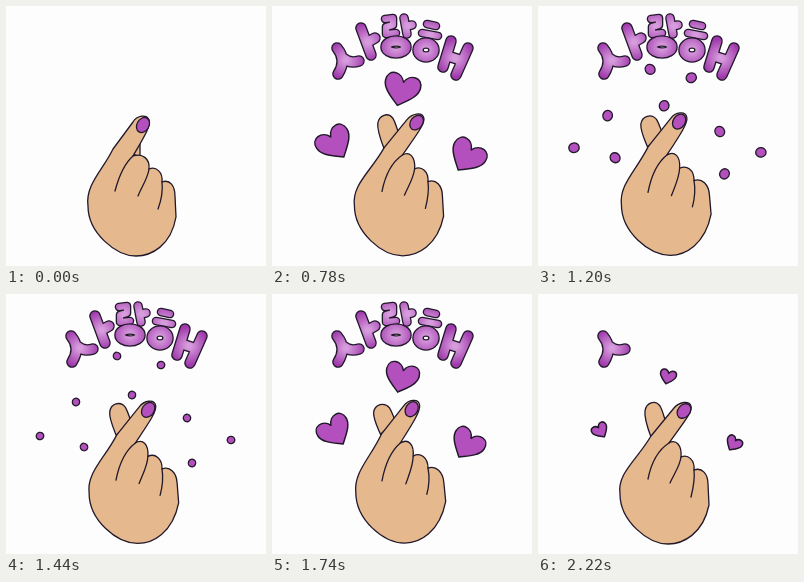
Recreate the animation shown at these times as an HTML page with a canvas. Size 260 by 260 pixels, loop 2280 ms.

```html
<!DOCTYPE html>
<html lang="ko">
<head>
<meta charset="utf-8">
<title>사랑해</title>
<style>
  html, body { margin: 0; width: 100%; height: 100%; overflow: hidden; background: #fdfdfe; }
  canvas { display: block; }
</style>
</head>
<body>
<canvas id="stage" width="260" height="260"></canvas>
<script>
const ctx = document.getElementById('stage').getContext('2d');
const LOOP = 2280, REST = 480, STEP = 60, LAST = 29;
const INK = '#21182a', SKIN = '#e6b88e', PURPLE = '#b350bd';

// Poses share one path structure, so their numbers can be blended.
const restPose = {
  back: 'M125 147 L134 136 L134 151 Z',
  body: 'M82 200 C79 179 97 164 107 143 L127 116 C131 109 141 108 143 114 C145 120 138 131 127 150 C137 147 144 153 143 163 C150 160 157 166 156 176 C164 173 169 180 169 190 L170 211 C165 240 145 250 130 250 C110 250 82 227 82 200 Z',
  creases: 'M127 150 C119 157 113 170 109 185 M143 163 C142 172 136 180 132 190 M156 176 C157 185 155 195 152 203',
  nail: [137, 119, -60]
};
const crossPose = {
  back: 'M113 143 C110 135 106 124 107 117 C108 109 117 105 122 112 C125 117 126 124 128 128 Z',
  body: 'M82 200 C79 179 99 166 113 142 L136 114 C141 108 151 106 153 112 C155 117 146 128 131 149 C138 145 144 151 143 163 C150 160 157 166 156 176 C164 173 170 180 170 190 L171 211 C165 240 145 250 130 250 C110 250 82 227 82 200 Z',
  creases: 'M131 149 C120 156 113 170 110 185 M143 163 C142 172 136 180 132 189 M156 176 C157 185 155 195 153 203',
  nail: [146, 117, -50]
};
const tiltPose = {
  back: 'M108 140 C105 133 101 126 101 119 C102 110 112 108 117 114 C120 119 121 123 123 127 Z',
  body: 'M84 198 C82 178 98 164 109 140 L131 112 C136 105 146 104 147 111 C148 117 140 130 128 149 C136 144 142 150 141 162 C148 158 156 163 156 174 C164 171 171 178 172 188 L174 207 C168 238 148 249 133 249 C112 249 84 226 84 198 Z',
  creases: 'M128 149 C119 157 113 171 110 187 M141 162 C141 172 137 181 134 190 M156 174 C158 184 157 193 155 200',
  nail: [139, 115, -60]
};
const tilt = [0, 0, 0, 0, .08, .2, .4, .75, .9, 1, .95, .85, .7, .55, .45];

// Each lettering part: the step it appears at, its gradient centre, stroke width, path.
const letters = [
  [0, 74, 54, 9, 'M65 42 Q75 54 66 68 M71 52 Q78 58 87 55'],
  [1, 96, 36, 9, 'M89 22 L99 49 M96 36 L103 32'],
  [2, 118, 20, 6, 'M113 13 L121 12 L121 19 L114 21 L114 28 L124 27'],
  [2, 136, 20, 7, 'M132 12 L135 28 M135 20 L140 19'],
  [3, 124, 41, 9, 'M114 41 A10 6 0 1 1 134 41 A10 6 0 1 1 114 41 Z'],
  [4, 158, 29, 6, 'M155 18 L164 20 M150 27 L166 30'],
  [4, 154, 44, 9, 'M146 44 A8 7 0 1 1 162 44 A8 7 0 1 1 146 44 Z'],
  [5, 183, 52, 9, 'M179 35 L171 61 M196 42 L184 69 M176 50 L188 54']
].map(([from, x, y, width, d]) => ({ from, x, y, width, path: new Path2D(d) }));

const heartPath = new Path2D('M0 18 C-7 12 -18 5 -18 -4 C-18 -16 -4 -16 0 -6 C4 -16 18 -16 18 -4 C18 5 7 12 0 18 Z');
const heartScale = [.45, .7, .92, 1.12, 1.08, 1, 1, .97, .93];
// Heart centre, its angle, and the first and last place of every drop it bursts into.
const hearts = [
  { x: 130, y: 82, angle: 15, drops: [[120, 73, 111, 62], [141, 77, 155, 71], [127, 91, 126, 101]] },
  { x: 62, y: 136, angle: -33, drops: [[50, 140, 34, 142], [67, 121, 70, 108], [71, 143, 78, 153]] },
  { x: 196, y: 149, angle: 33, drops: [[187, 136, 181, 124], [208, 149, 225, 146], [190, 160, 186, 169]] }
];

const mix = (a, b, t) => a + (b - a) * t;
const radians = degrees => degrees * Math.PI / 180;

function blend(a, b, t) {
  const ends = b.match(/\d+/g);
  let i = 0;
  return new Path2D(a.replace(/\d+/g, n => mix(+n, +ends[i++], t).toFixed(2)));
}

function paint(path, color) {
  ctx.fillStyle = color;
  ctx.fill(path);
  ctx.stroke(path);
}

function oval(x, y, rx, ry, angle) {
  const path = new Path2D();
  path.ellipse(x, y, rx, ry, angle, 0, 2 * Math.PI);
  paint(path, PURPLE);
}

function drawHand(from, to, t) {
  paint(blend(from.back, to.back, t), SKIN);
  paint(blend(from.body, to.body, t), SKIN);
  ctx.stroke(blend(from.creases, to.creases, t));
  const [x, y, angle] = from.nail.map((n, i) => mix(n, to.nail[i], t));
  oval(x, y, 8, 6, radians(angle));
}

function drawLetter({ x, y, width, path }) {
  const shade = ctx.createRadialGradient(x, y, 2, x, y, 19);
  shade.addColorStop(0, '#d79cdd');
  shade.addColorStop(1, '#a03aac');
  ctx.save();
  ctx.lineWidth = width + 2.6;
  ctx.stroke(path);
  ctx.lineWidth = width;
  ctx.strokeStyle = shade;
  ctx.stroke(path);
  ctx.restore();
}

function drawHeart({ x, y, angle }, scale) {
  ctx.save();
  ctx.translate(x, y);
  ctx.rotate(radians(angle));
  ctx.scale(scale, scale);
  ctx.lineWidth = 1.5 / scale;
  paint(heartPath, PURPLE);
  ctx.restore();
}

function drawBurst(heart, state) {
  const u = (state - 9) / 5, p = u * (2 - u) / .96, r = mix(9.4, 2.4, u);
  for (const [x0, y0, x1, y1] of heart.drops) {
    const x = mix(x0, x1, p), y = mix(y0, y1, p);
    oval(x, y, r, r * mix(.8, 1, u), Math.atan2(y - heart.y, x - heart.x));
  }
}

function draw(time) {
  ctx.fillStyle = '#fdfdfe';
  ctx.fillRect(0, 0, 260, 260);
  ctx.strokeStyle = INK;
  ctx.lineWidth = 1.3;
  ctx.lineCap = ctx.lineJoin = 'round';
  if (time < REST) return drawHand(restPose, restPose, 0);

  // The sequence runs forwards, then backwards.
  const step = Math.floor((time - REST) / STEP);
  const state = Math.min(step, LAST - step);
  drawHand(crossPose, tiltPose, tilt[state]);
  letters.filter(part => state >= part.from).forEach(drawLetter);
  for (const heart of hearts) {
    if (state < 9) drawHeart(heart, heartScale[state]);
    else drawBurst(heart, state);
  }
}

const start = performance.now();
function tick() {
  draw((performance.now() - start) % LOOP);
  requestAnimationFrame(tick);
}
tick();
</script>
</body>
</html>
```
